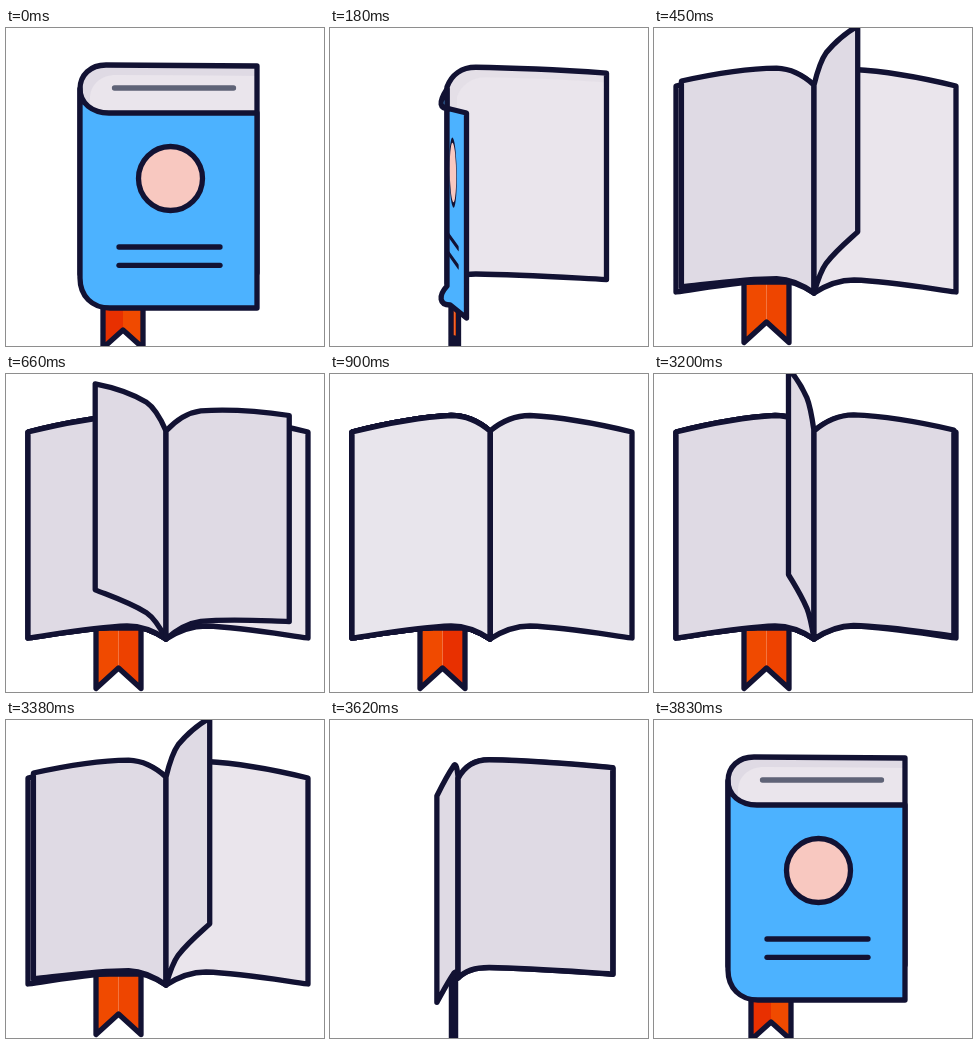
Recreate the animation shown at these times as an HTML page with a canvas. Size 318x318 px, loop 4860 ms.

```html
<!DOCTYPE html>
<html lang="en">
<head>
<meta charset="utf-8">
<title>Book opening</title>
<style>
  html, body { margin: 0; height: 100%; overflow: hidden; background: #fff; }
  canvas { display: block; width: 100vw; height: 100vh; }
</style>
</head>
<body>
<canvas id="stage" width="318" height="318"></canvas>
<script>
const ctx = document.getElementById('stage').getContext('2d');
const INK = '#121233', BLUE = '#4cb2ff', PAPER = '#eae5ec', LEAF = '#dfdae4', REST = '#e8e5ec';
const LOOP = 4860, OPENED = 900, CLOSE_START = 2960, CLOSED = 3830, STEP = 30;
const COVER_TIME = 360, LEAF_START = 204, LEAF_GAP = 137, LEAF_TIME = 270, LEAVES = 4;

const mix = (a, b, k) => a + (b - a) * k;
const ease = u => (1 - Math.cos(Math.PI * Math.min(1, Math.max(0, u)))) / 2;

// Closing replays the opening backwards.
function poseTime(ms) {
  const t = ms % LOOP;
  if (t < OPENED) return Math.floor(t / STEP) * STEP;
  if (t < CLOSE_START) return OPENED;
  return t < CLOSED ? Math.ceil((CLOSED - t) / STEP) * STEP : 0;
}

function paint(fill) {
  ctx.fillStyle = fill;
  ctx.fill();
  ctx.stroke();
}

function line(x1, y1, x2, y2) {
  ctx.beginPath();
  ctx.moveTo(x1, y1);
  ctx.lineTo(x2, y2);
  ctx.stroke();
}

// A sheet hinged at the spine; negative width lies to the left.
function tracePage(spine, width, open, lift) {
  const bend = mix(0.147, 0.282, open * open);
  const at = (f, y) => [spine + width * f, y - lift * f];
  const c1 = bend * 0.3 * open, c2 = bend * mix(0.4, 0.6, open);
  const f1 = mix(bend, 1, 1 / 3), f2 = mix(bend, 1, 2 / 3);
  const top = mix(37, 41.5, open), edge = 38 + 20 * open ** 1.5;
  const low = mix(240, 252, open), lowEdge = edge + mix(207, 206, open);
  const hinge = mix(246, 265, open);
  ctx.beginPath();
  ctx.moveTo(...at(0, mix(61, 57, open)));
  ctx.bezierCurveTo(...at(c1, 47), ...at(c2, top), ...at(bend, top));
  ctx.bezierCurveTo(...at(f1, mix(top, edge, 0.1)), ...at(f2, mix(top, edge, 0.5)), ...at(1, edge));
  ctx.lineTo(...at(1, lowEdge));
  ctx.bezierCurveTo(...at(f2, mix(low, lowEdge, 0.6)), ...at(f1, mix(low, lowEdge, 0.1)), ...at(bend, low));
  ctx.bezierCurveTo(...at(c2, low), ...at(c1, mix(low, hinge, 0.4)), ...at(0, hinge));
  ctx.closePath();
}

function drawRibbon(spine, open, swing, t) {
  const mid = spine + mix(43, -47.5, open) + 10 * swing;
  const half = mix(20, -22.5, open) + 5 * swing;
  const tail = mix(320, 314.5, open) + 11 * swing;
  const notch = mix(302, 294, open) + 12 * swing;
  const top = 254;
  const trace = sides => {
    ctx.beginPath();
    ctx.moveTo(mid, top);
    for (const side of sides) {
      ctx.lineTo(mid + side * half, top);
      ctx.lineTo(mid + side * half, tail);
      ctx.lineTo(mid, notch);
    }
    ctx.closePath();
  };
  const glow = Math.sin(Math.PI * t / OPENED) ** 0.6 * 0.8;
  ctx.fillStyle = `rgb(${mix(232, 240, glow)}, ${mix(48, 74, glow)}, 0)`;
  trace([-1]);
  ctx.fill();
  ctx.fillStyle = '#f04a00';
  trace([1]);
  ctx.fill();
  ctx.beginPath();
  ctx.moveTo(mid - half, top);
  ctx.lineTo(mid - half, tail);
  ctx.lineTo(mid, notch);
  ctx.lineTo(mid + half, tail);
  ctx.lineTo(mid + half, top);
  ctx.closePath();
  ctx.stroke();
}

function drawCover(spine, scale, swing) {
  const x = u => spine + u * scale;
  const bulge = 9 * swing, top = 85 - 4 * swing, low = 280 - 3 * swing;
  ctx.beginPath();
  ctx.moveTo(spine, 61);
  ctx.bezierCurveTo(spine - bulge, 75, x(12) - bulge, top, x(29), top);
  ctx.lineTo(x(177), 85);
  ctx.lineTo(x(177), 280 + 10 * swing);
  ctx.lineTo(x(30), low);
  ctx.bezierCurveTo(x(12) - bulge, low, spine - bulge, 268, spine, mix(250, 258, swing));
  ctx.closePath();
  paint(BLUE);

  ctx.save();
  ctx.transform(scale, 0.155 * swing, 0, 1, spine - 4 * swing, -20 * swing);
  ctx.beginPath();
  ctx.arc(90.5, 150.5, 32, 0, Math.PI * 2);
  paint('#f8c8c0');
  line(39, 219, 140, 219);
  line(39, 237.3, 140, 237.3);
  ctx.restore();
}

// Lighter inside of the rolled top, leaving a shaded rim.
function shadeRoll(spine, width, open) {
  ctx.save();
  ctx.clip();
  ctx.globalAlpha = 1 - open;
  ctx.fillStyle = LEAF;
  ctx.fillRect(0, 0, 318, 318);
  ctx.translate(10, 10);
  tracePage(spine, width, open, 0);
  ctx.globalAlpha = 1;
  ctx.fillStyle = PAPER;
  ctx.fill();
  ctx.restore();
}

function draw(t) {
  const open = ease(t / COVER_TIME);
  const swing = 4 * open * (1 - open);
  const spine = mix(74, 160, open);
  const rightWidth = mix(177, 142, open);
  const coverWidth = mix(177, -138, open);
  const atRest = t >= OPENED;

  ctx.fillStyle = '#fff';
  ctx.fillRect(0, 0, 318, 318);
  ctx.strokeStyle = INK;
  ctx.lineWidth = 5.3;
  ctx.lineCap = ctx.lineJoin = 'round';

  drawRibbon(spine, open, swing, t);

  if (coverWidth <= 0) {
    tracePage(spine, coverWidth, open, -30 * swing);
    paint(atRest ? REST : LEAF);
  }

  tracePage(spine, rightWidth, open, 0);
  ctx.fillStyle = atRest ? REST : PAPER;
  ctx.fill();
  if (open < 1) shadeRoll(spine, rightWidth, open);
  tracePage(spine, rightWidth, open, 0);
  ctx.stroke();

  if (open < 0.25) {
    ctx.save();
    ctx.globalAlpha = 1 - open * 4;
    ctx.strokeStyle = '#5f6377';
    line(spine + 34.5, 60, spine + 153.5 * (1 - open), 60);
    ctx.restore();
  }

  if (coverWidth > 0) drawCover(spine, coverWidth / 177, swing);

  for (let i = 0; i < LEAVES; i++) {
    const turn = ease((t - LEAF_START - i * LEAF_GAP) / LEAF_TIME);
    if (turn <= 0) continue;
    tracePage(spine, mix(rightWidth, -138, turn), open, 264 * turn * (1 - turn));
    paint(atRest ? REST : LEAF);
  }
}

const start = performance.now();
function tick() {
  draw(poseTime(performance.now() - start));
  requestAnimationFrame(tick);
}
tick();
</script>
</body>
</html>
```
